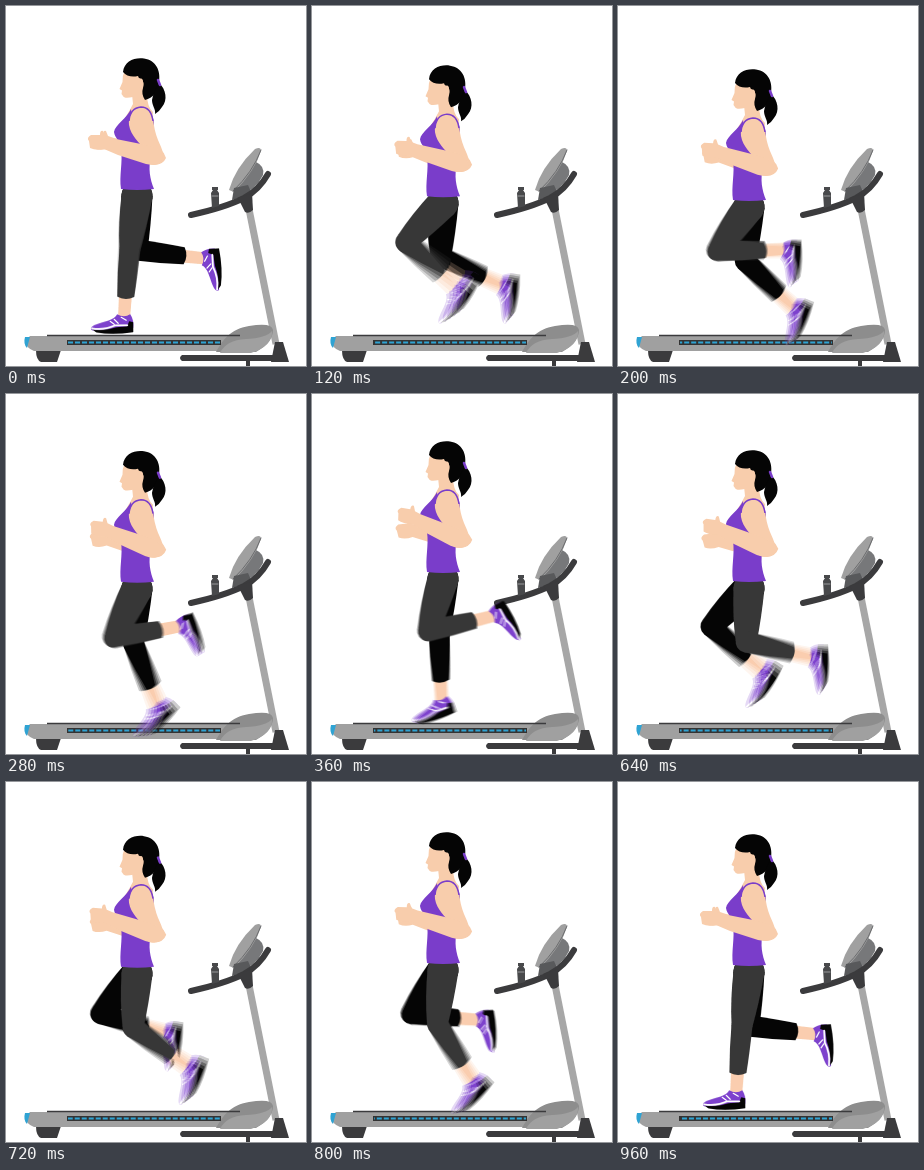
Recreate the animation shown at these times as an HTML page with a canvas. Size 300 px wide and 360 px high, loop 1 s.

```html
<!DOCTYPE html>
<html>
<head>
<meta charset="utf-8">
<style>
html, body { margin: 0; height: 100%; overflow: hidden; background: #fff; }
canvas { display: block; }
</style>
</head>
<body>
<canvas id="stage" width="300" height="360"></canvas>
<script>
const W = 300, H = 360, LOOP = 1000, STEP = 40, RAD = Math.PI / 180;
const SKIN = '#f8cdac', PURPLE = '#7a3dca', BLACK = '#050505', PANTS = '#343434', BLUE = '#2fa3d3';
const stage = document.getElementById('stage').getContext('2d');
const makeLayer = () => Object.assign(document.createElement('canvas'), { width: W, height: H }).getContext('2d');
const pose = makeLayer(), legs = makeLayer();

// Keys: [time, value, ...]; leg values are thigh, shin and foot angles in degrees.
const BOB = [[0, 0], [200, 11], [360, -5], [400, -8], [520, 0], [640, 4], [800, -2], [870, -4], [960, 0], [1000, 0]];
const NEAR_ARM = [[0, 0], [200, 3], [360, 10], [520, 11], [640, 8], [800, 2], [960, 0], [1000, 0]];
const FAR_ARM = [[0, 0], [200, -3], [360, -6], [520, -7], [640, -7], [800, -2], [960, 0], [1000, 0]];
const NEAR_LEG = [[0, -7.5, -5, 0], [110, -44, 46, 50], [200, -36, 91, 85], [360, -16, 103, 117],
  [520, -5, 98, 115], [640, -3, 77, 87], [800, -6, 32, 44], [960, -7.5, -5, 0], [1000, -7.5, -5, 0]];
const FAR_LEG = [[0, 0, 83, 93], [200, -4, 46, 66], [360, -4, 2, 18], [520, -18, -7, 1],
  [640, -45, 50, 55], [800, -36, 85, 93], [960, 0, 83, 93], [1000, 0, 83, 93]];

// Monotone cubic interpolation of column c.
function at(keys, t, c = 1) {
  const rate = i => (keys[i + 1][c] - keys[i][c]) / (keys[i + 1][0] - keys[i][0]);
  const slope = i => {
    if (i === 0 || i === keys.length - 1) return 0;
    const a = rate(i - 1), b = rate(i);
    return a * b <= 0 ? 0 : 2 * a * b / (a + b);
  };
  t = (t + LOOP) % LOOP;
  let i = 0;
  while (t >= keys[i + 1][0]) i++;
  const span = keys[i + 1][0] - keys[i][0], u = (t - keys[i][0]) / span, v = 1 - u;
  return v * v * (1 + 2 * u) * keys[i][c] + u * u * (3 - 2 * u) * keys[i + 1][c]
    + span * u * v * (v * slope(i) - u * slope(i + 1));
}

function fill(g, color, d) {
  g.fillStyle = color;
  g.fill(new Path2D(d));
}

function line(g, color, width, d, cap = 'round') {
  g.strokeStyle = color;
  g.lineWidth = width;
  g.lineCap = cap;
  g.lineJoin = 'round';
  g.stroke(new Path2D(d));
}

function turned(g, x, y, deg, draw) {
  g.save();
  g.translate(x, y);
  g.rotate(deg * RAD);
  draw();
  g.restore();
}

function disc(g, color, r) {
  g.fillStyle = color;
  g.beginPath();
  g.arc(0, 0, r, 0, 7);
  g.fill();
}

function shoe(g) {
  fill(g, PURPLE, 'M-7 -2C-10 4 -20 5 -28 8C-34 10 -34 13 -32 14L9 12C10 6 8 1 6 -2Q0 2 -7 -2Z');
  fill(g, BLACK, 'M-32 13Q-20 15 -8 11L3 10L5 5L9 6L9 16Q-12 19 -28 16Z');
  line(g, '#fff', 1.8, 'M-32 12Q-20 14 -9 9L3 9');
  line(g, '#fff', 1.2, 'M-14 5L-10 8M-10 3L-6 7M-3 1L2 4');
}

function leg(g, keys, t, hipY, color) {
  const [thigh, shin, foot] = [1, 2, 3].map(c => at(keys, t, c));
  const hipX = 131;
  const kneeX = hipX + 54 * Math.sin(thigh * RAD), kneeY = hipY + 54 * Math.cos(thigh * RAD);
  const ankleX = kneeX + 67 * Math.sin(shin * RAD), ankleY = kneeY + 67 * Math.cos(shin * RAD);
  turned(g, kneeX, kneeY, -shin, () => fill(g, SKIN, 'M-7 44L6 44L6 68Q0 72 -6 68Z'));
  turned(g, ankleX, ankleY, -foot, () => shoe(g));
  turned(g, hipX, hipY, -thigh, () => {
    disc(g, color, 15.5);
    fill(g, color, 'M-15.5 0L15.5 0Q14 30 10.5 54L-10.5 54Q-15 30 -15.5 0Z');
  });
  turned(g, kneeX, kneeY, -shin, () => {
    disc(g, color, 10.5);
    fill(g, color, 'M-10.5 0L10.5 0Q10 26 8.5 47Q0 52 -8.5 48Q-10.5 24 -10.5 0Z');
  });
}

// Averages several moments so that fast limbs smear.
function drawLegs(t, bob) {
  const shots = 5;
  legs.clearRect(0, 0, W, H);
  legs.globalCompositeOperation = 'lighter';
  legs.globalAlpha = 1 / shots;
  for (let i = 0; i < shots; i++) {
    const moment = t + (i - 2) * 7;
    pose.clearRect(0, 0, W, H);
    leg(pose, FAR_LEG, moment, 190 + bob, BLACK);
    leg(pose, NEAR_LEG, moment, 190 + bob, PANTS);
    legs.drawImage(pose.canvas, 0, 0);
  }
  stage.drawImage(legs.canvas, 0, 0);
}

function forearm(g, x, deg) {
  turned(g, x, 149, deg, () => fill(g, SKIN,
    'M-6 -10L-41 -17L-47 -19L-49 -24Q-52 -25 -52 -20L-61 -20Q-66 -17 -63 -14L-62 -7Q-56 -4 -48 -6L-34 0L-6 9Q7 12 11 3Q8 -8 -6 -10Z'));
}

function torso(g) {
  fill(g, SKIN, 'M126 88L127 98Q124 104 119 112L146 118L147 106Q141 101 141 88Z');
  fill(g, PURPLE, 'M125 103C121 112 109 119 108 126C109 133 115 135 115 143C117 156 113 170 115 183Q131 185 148 183C144 173 142 163 145 150L148 116Q145 101 135 101L126 112Z');
}

function head(g) {
  fill(g, SKIN, 'M119 64Q116 70 116.5 76L113.5 83L116 84.5L115.5 88L117 90Q118 93 127 91L141 92L140 65Z');
  fill(g, BLACK, 'M117 66C118 55 129 51 138 52.5C150 54 155 65 153 76C152 86 147 92 139 94Q135 88 137 82Q139 76 135 73Q132 72 132 70Q122 72 117 66Z');
  fill(g, SKIN, 'M133 73Q137 71 137 76Q136 82 133 82Z');
  fill(g, BLACK, 'M153 77C160 83 162 94 156 101Q153 106 149 108C150 103 146 100 146 94Q147 87 153 77Z');
  line(g, PURPLE, 2.5, 'M152 74L154 79');
}

function nearArm(g, deg) {
  fill(g, SKIN, 'M135 101C127 102 122 111 123 119C125 130 133 136 138 143L141 157Q151 162 158 154Q159 149 152 134Q148 124 147 112Q144 102 135 101Z');
  line(g, PURPLE, 1.5, 'M123 115Q124 102 135 101Q145 101 147 115', 'butt');
  forearm(g, 146, deg);
}

function treadmill(g, t) {
  fill(g, '#3b3b3d', 'M30 344H55L51 356H35Q30 354 30 344Z');
  fill(g, '#3b3b3d', 'M176 349H270V355H176Q172 352 176 349ZM240 355H244V360H240Z');
  line(g, '#a7a7a7', 7, 'M243 203L270 338', 'butt');
  fill(g, '#a0a0a0', 'M24 330H240V345H28Q20 342 19 335Z');
  fill(g, '#8d8d8d', 'M210 346C217 334 224 323 243 320Q266 316 267 324Q267 336 250 346Z');
  fill(g, '#a0a0a0', 'M214 347Q220 334 240 333Q260 332 266 325Q267 340 245 347Z');
  fill(g, BLUE, 'M19 331H24L21 342Q17 338 19 331Z');
  line(g, '#3b3b3d', 1.5, 'M41 329.5H234', 'butt');
  fill(g, '#333', 'M61 334H215V339H61Z');
  g.save();
  g.setLineDash([5, 2]);
  g.lineDashOffset = 49 * t / LOOP;
  line(g, BLUE, 2, 'M62 336.5H214', 'butt');
  g.restore();
  fill(g, '#3b3b3d', 'M269 336H277L283 356H265Z');

  // Console, handle and bottle
  fill(g, '#77787a', 'M231 181L250 156Q259 160 257 169Q250 184 234 189Z');
  fill(g, '#a0a0a0', 'M223 184Q229 162 249 143Q255 140 255 145Q249 165 228 186Z');
  line(g, '#6b6c6e', 1, 'M227 185Q247 166 255 144');
  fill(g, '#58595b', 'M228 182L242 179L246 188L226 194Z');
  line(g, '#3b3b3d', 6, 'M185 209C212 203 226 198 238 192Q253 184 262 168');
  fill(g, '#3b3b3d', 'M232 192L246 187L247 204Q243 208 239 206Z');
  fill(g, '#48494b', 'M206 181H212V184H211L213 187V200L206 202L205 187L207 184H206Z');
  line(g, '#98999b', 1, 'M206 190H212');
}

function draw(t) {
  const bob = at(BOB, t), g = stage;
  g.fillStyle = '#fff';
  g.fillRect(0, 0, W, H);
  treadmill(g, t);
  g.save();
  g.translate(0, bob);
  forearm(g, 149, at(FAR_ARM, t));
  g.restore();
  drawLegs(t, bob);
  g.save();
  g.translate(0, bob);
  torso(g);
  head(g);
  nearArm(g, at(NEAR_ARM, t));
  g.restore();
}

const start = performance.now();
function frame() {
  const t = (performance.now() - start) % LOOP;
  draw(Math.floor(t / STEP) * STEP);
  requestAnimationFrame(frame);
}
frame();
</script>
</body>
</html>
```
